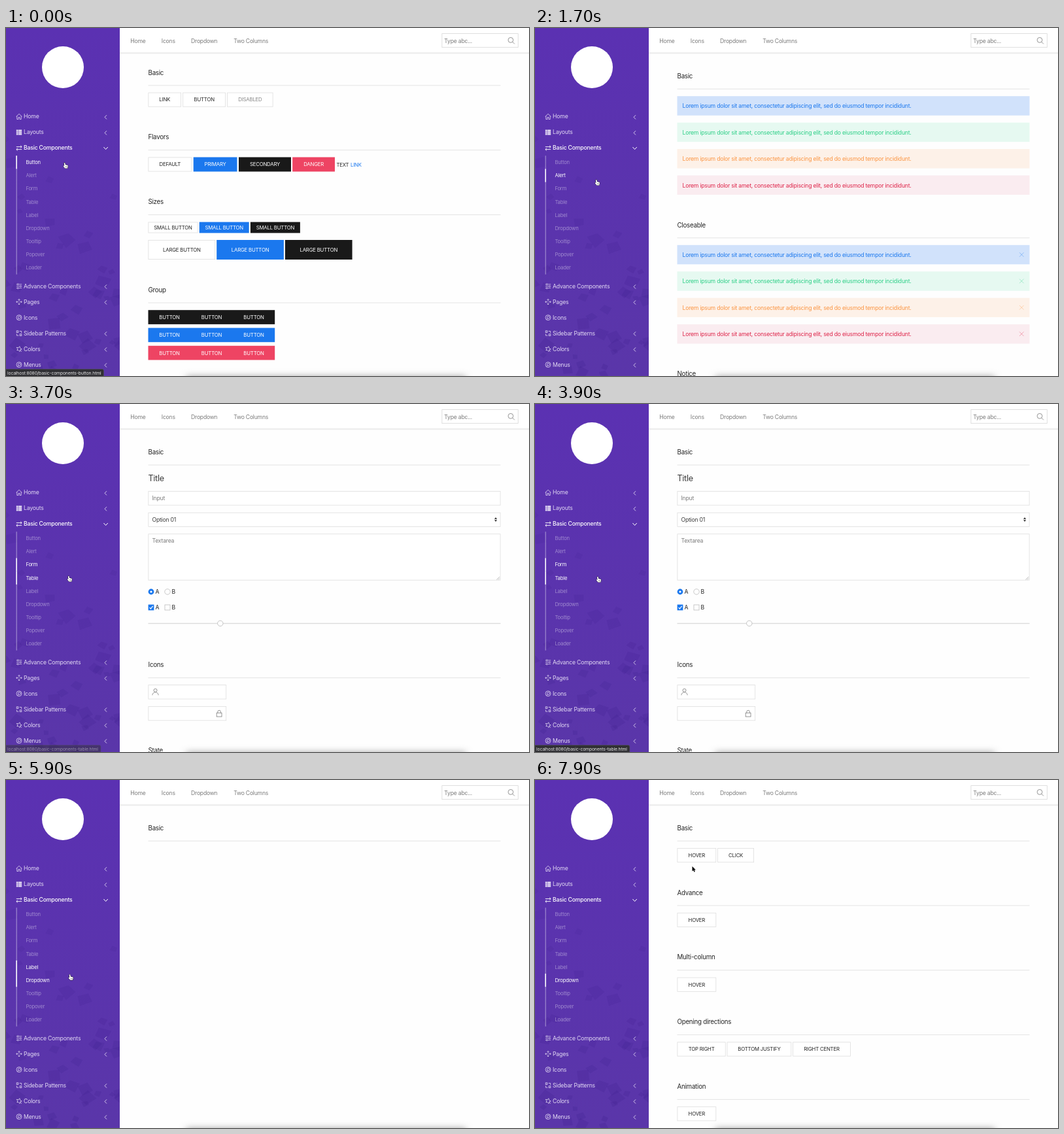
An HTML page with a canvas that plays this animation: 800 by 532 pixels, repeating every 8000 ms.

```html
<!DOCTYPE html>
<html lang="en">
<head>
<meta charset="utf-8">
<title>Component gallery</title>
<style>
html, body { margin: 0; width: 100%; height: 100%; overflow: hidden; background: #fefefe; }
canvas { display: block; width: 800px; height: 532px; }
</style>
</head>
<body>
<canvas id="stage"></canvas>
<script>
const W = 800, H = 532, LOOP = 8000, STEP = 100;
const canvas = document.getElementById('stage');
const c = canvas.getContext('2d');
const dpr = window.devicePixelRatio || 1;
canvas.width = W * dpr;
canvas.height = H * dpr;

const BLUE = '#1b78ee', BLACK = '#191919', RED = '#ee4463';
const INK = '#242424', EDGE = '#dedede', RULE = '#e2e2e2', GREY = '#7c7c7c';
const LEFT = 217.5, RIGHT = 756.5;
const BODY = 8.65, SMALL = 7.78, HEAD = 9.73;

// y is the middle of the capitals
function text(str, x, y, size = BODY, color = INK, align = 'left', weight = 400) {
  c.font = `${weight} ${size}px Inter, "Open Sans", sans-serif`;
  c.letterSpacing = (-0.024 * size) + 'px';
  c.textAlign = align;
  c.fillStyle = color;
  c.fillText(str, x, y + size * 0.364);
}
function line(color, width, ...pts) {
  c.strokeStyle = color;
  c.lineWidth = width;
  c.beginPath();
  for (let i = 0; i < pts.length; i += 2) c.lineTo(pts[i], pts[i + 1]);
  c.stroke();
}
function rect(x, y, w, h, fill, edge) {
  if (fill) { c.fillStyle = fill; c.fillRect(x, y, w, h); }
  if (edge) { c.strokeStyle = edge; c.lineWidth = 0.8; c.strokeRect(x + 0.4, y + 0.4, w - 0.8, h - 0.8); }
}
function disc(x, y, r, fill, edge, width = 0.8) {
  c.beginPath();
  c.arc(x, y, r, 0, 7);
  if (fill) { c.fillStyle = fill; c.fill(); }
  if (edge) { c.strokeStyle = edge; c.lineWidth = width; c.stroke(); }
}
function rule(y) { rect(LEFT, y - 0.4, RIGHT - LEFT, 0.9, RULE); }
function section(title, y) {
  text(title, LEFT, y, HEAD);
  rule(y + 19.8);
}
function button(label, x1, x2, y, h = 22, fill = '', color = fill ? '#fff' : INK) {
  rect(x1, y, x2 - x1, h, fill || '#fff', fill ? '' : EDGE);
  text(label, (x1 + x2) / 2, y + h / 2, SMALL, color, 'center');
}

function buttonPage() {
  section('Basic', 68);
  button('LINK', LEFT, 268, 98.6);
  button('BUTTON', 270.3, 336, 98.6);
  button('DISABLED', 338.2, 408.5, 98.6, 22, '', '#858585');
  section('Flavors', 166.8);
  button('DEFAULT', LEFT, 284.2, 197.5);
  button('PRIMARY', 286.7, 353.5, 197.5, 22, BLUE);
  button('SECONDARY', 356, 436, 197.5, 22, BLACK);
  button('DANGER', 438.2, 503, 197.5, 22, RED);
  text('TEXT', 505.5, 208.8, SMALL);
  text('LINK', 527, 208.8, SMALL, BLUE);
  section('Sizes', 265.6);
  ['', BLUE, BLACK].forEach((fill, i) => {
    button('SMALL BUTTON', LEFT + i * 78.2, 293.5 + i * 78.2, 296.6, 16.8, fill);
    button('LARGE BUTTON', LEFT + i * 104.7, 320.2 + i * 104.7, 324, 30, fill);
  });
  section('Group', 400.2);
  [BLACK, BLUE, RED].forEach((fill, i) => {
    const y = 431.2 + i * 27.3;
    rect(LEFT, y, 193.7, 21.7, fill);
    for (let k = 0; k < 3; k++) text('BUTTON', 250 + k * 64.5, y + 10.9, SMALL, '#fff', 'center');
  });
}

const ALERTS = [['#d1e2fb', BLUE], ['#e6f9f1', '#2bcf86'], ['#fdf1e8', '#fb9542'], ['#faecf0', '#de2449']];
function alerts(top, closable) {
  ALERTS.forEach(([bg, fg], i) => {
    const y = top + i * 40.4;
    rect(LEFT, y, RIGHT - LEFT, 29.5, bg);
    text('Lorem ipsum dolor sit amet, consectetur adipiscing elit, sed do eiusmod tempor incididunt.',
      225.5, y + 15, BODY, fg);
    if (!closable) return;
    c.globalAlpha = 0.5;
    line(fg, 0.7, 741, y + 11.4, 747.6, y + 18);
    line(fg, 0.7, 747.6, y + 11.4, 741, y + 18);
    c.globalAlpha = 1;
  });
}
function alertPage() {
  section('Basic', 73.3);
  alerts(104.2);
  section('Closeable', 301);
  alerts(331.8, true);
  section('Notice', 528.3);
}

function formPage() {
  const full = RIGHT - LEFT;
  section('Basic', 73.3);
  text('Title', LEFT, 113.6, 12.6, '#3a3a3a');
  rect(LEFT, 133, full, 22.2, '#fff', EDGE);
  text('Input', 223.5, 144.3, BODY, GREY);
  rect(LEFT, 165.8, full, 22.2, '#fff', EDGE);
  text('Option 01', 223.5, 177, BODY, '#3a3a3a');
  c.fillStyle = '#333';
  c.beginPath();
  c.moveTo(747, 175.9); c.lineTo(749.1, 173.2); c.lineTo(751.2, 175.9);
  c.moveTo(747, 177.3); c.lineTo(749.1, 180); c.lineTo(751.2, 177.3);
  c.fill();
  rect(LEFT, 198.4, full, 71.2, '#fff', EDGE);
  text('Textarea', 223.5, 208.4, BODY, GREY);
  line('#888', 0.6, 750.6, 268.6, 755, 264.2);
  line('#888', 0.6, 753, 268.6, 755, 266.6);
  disc(222, 287, 4.4, BLUE);
  disc(222, 287, 1.6, '#fff');
  disc(247, 287, 4.2, '#fff', '#bbb');
  rect(217.6, 306.6, 8.8, 8.8, BLUE);
  line('#fff', 1.2, 219.6, 311.2, 221.4, 313, 224.6, 308.8);
  rect(242.6, 306.6, 8.8, 8.8, '#fff', '#bbb');
  for (const y of [287.2, 311.2]) {
    text('A', 228.4, y);
    text('B', 253.4, y);
  }
  rect(LEFT, 334.8, full, 1.4, '#dcdcdc');
  disc(327.8, 335.4, 4.2, '#fff', '#b8b8b8');
  section('Icons', 398.8);
  rect(LEFT, 429.2, 119.6, 22.2, '#fff', EDGE);
  rect(LEFT, 462, 119.6, 22.2, '#fff', EDGE);
  disc(228.5, 437.8, 2.5, '', GREY, 0.8);
  c.beginPath();
  c.arc(228.5, 445.2, 4.6, Math.PI, 0);
  c.stroke();
  c.strokeRect(322.2, 472.2, 7.8, 5.8);
  c.beginPath();
  c.arc(326.1, 470.6, 2.3, Math.PI, 0);
  c.lineTo(328.4, 472.2);
  c.moveTo(323.8, 470.6);
  c.lineTo(323.8, 472.2);
  c.stroke();
  section('State', 529.3);
}

function cells(label, y, size = BODY, color = '#3a3a3a') {
  for (let k = 0; k < 3; k++) text(label, 224 + k * 179.5, y, size, color);
}
function tablePage() {
  section('Basic', 73.3);
  cells('TABLE HEADING', 119, SMALL, GREY);
  cells('Table Data', 148.8);
  cells('Table Data', 179.4);
  cells('Table Footer', 209.2, 7.7);
  section('Bordered', 269.3);
  cells('TABLE HEADING', 315, SMALL, GREY);
  for (let i = 0; i < 3; i++) {
    rule(329.4 + i * 31.1);
    cells('Table Data', 345.2 + i * 31.1);
  }
  section('Striped', 468.5);
  cells('TABLE HEADING', 514.2, SMALL, GREY);
  rule(528.6);
}

function labelPage() {
  section('Basic', 73.3);
}

function dropdownPage() {
  ['Basic', 'Advance', 'Multi-column', 'Opening directions', 'Animation'].forEach((title, i) => {
    const y = 73.3 + i * 98.8;
    section(title, y);
    if (i !== 3) return button('HOVER', LEFT, 277.2, y + 30.8);
    button('TOP RIGHT', LEFT, 291.6, y + 30.8);
    button('BOTTOM JUSTIFY', 293.6, 392.2, y + 30.8);
    button('RIGHT CENTER', 394.2, 482.8, y + 30.8);
  });
  button('CLICK', 279.2, 335, 104.1);
}

function header() {
  rect(174, 0, 626, 37.6, '#fff');
  rect(174, 37.6, 626, 1, '#d9d9d9');
  rect(174, 38.6, 626, 1.2, '#f4f4f4');
  text('Home', 190.3, 19.5, 8.6, GREY);
  text('Icons', 237.8, 19.5, 8.6, GREY);
  text('Dropdown', 283, 19.5, 8.6, GREY);
  text('Two Columns', 348.2, 19.5, 8.6, GREY);
  rect(666.5, 8.2, 117.2, 21.8, '#fff', '#d8d8d8');
  text('Type abc...', 670.3, 19.5, BODY, GREY);
  disc(772, 18.4, 3.9, '', GREY);
  line(GREY, 0.8, 774.8, 21.2, 778, 24.4);
}

// Icons are drawn around the origin in a 9 px box.
const smile = () => {
  disc(0, 0, 4, '', '#e2d9f3');
  disc(0.4, -0.3, 1.9, '', '#e2d9f3');
  line('#e2d9f3', 0.8, -2.6, 2.9, -0.6, 1.3);
};
const ICONS = {
  home: p => {
    line(p, 0.8, -4.4, 0, 0, -4.2, 4.4, 0);
    line(p, 0.8, -3.2, -1, -3.2, 4, -1, 4, -1, 1, 1, 1, 1, 4, 3.2, 4, 3.2, -1);
  },
  grid: p => {
    for (const y of [-4, -1.2, 1.6]) {
      rect(-4.2, y, 2.8, 2.4, p);
      rect(-0.9, y, 5.1, 2.4, p);
    }
  },
  swap: p => {
    line(p, 0.9, -4.2, -2, 4, -2);
    line(p, 0.9, 2.2, -3.8, 4.2, -2, 2.2, -0.2);
    line(p, 0.9, 4.2, 2, -4, 2);
    line(p, 0.9, -2.2, 0.2, -4.2, 2, -2.2, 3.8);
  },
  sliders: p => [-2.9, 0, 2.9].forEach((y, i) => {
    line(p, 0.7, -4.2, y, 4.2, y);
    disc(i % 2 ? 2.4 : -1.8, y, 1.1, '#5b36ab', p, 0.7);
  }),
  move: p => {
    for (let i = 0; i < 4; i++) {
      line(p, 0.8, 0, 1, 0, 4.2);
      line(p, 0.8, -1.4, 2.9, 0, 4.3, 1.4, 2.9);
      c.rotate(Math.PI / 2);
    }
  },
  smile,
  blocks: p => {
    c.strokeStyle = p;
    c.lineWidth = 0.8;
    c.strokeRect(-3.8, -3.8, 2.6, 2.6);
    c.strokeRect(1.2, 1.2, 2.6, 2.6);
    line(p, 0.8, 0.6, -3.2, 3.6, -3.2, 3.6, -0.4);
    line(p, 0.8, -3.6, 0.8, -3.6, 3.4, -0.6, 3.4);
  },
  pin: p => {
    line(p, 0.8, -3.8, -2.4, -0.8, -1.8, 0.8, -4, 1.8, -1, 4.2, 0.2, 1.6, 1.4, 1, 4, -1, 1.8, -3.2, 2, -2, 0, -3.8, -2.4);
    line(p, 0.8, 1.6, 1.6, 4, 4);
  }
};
const MENU = [
  ['Home', 135.2, 'home'], ['Layouts', 159.2, 'grid'], ['Basic Components', 183.3, 'swap'],
  ['Advance Components', 394.4, 'sliders'], ['Pages', 418.4, 'move'], ['Icons', 442.4, 'smile'],
  ['Sidebar Patterns', 466.4, 'blocks'], ['Colors', 490.4, 'pin'], ['Menus', 514.4, 'smile']
];
const SUB = ['Button', 'Alert', 'Form', 'Table', 'Label', 'Dropdown', 'Tooltip', 'Popover', 'Loader'];
const ROW = 20.17, SUB_TOP = 195.2;

function backdrop() {
  const g = c.createLinearGradient(0, 0, 0, H);
  g.addColorStop(0, '#5b31b2');
  g.addColorStop(1, '#5a36a9');
  rect(0, 0, 174, H, g);
  let seed = 11;
  const rnd = () => (seed = seed * 16807 % 2147483647) / 2147483647;
  for (let i = 0; i < 46; i++) {
    const x = rnd() * 174, y = 110 + 420 * Math.sqrt(rnd()), r = 5 + rnd() * 9, a = rnd() * 6;
    c.fillStyle = `rgba(50,20,130,${0.04 + 0.11 * y / H})`;
    c.beginPath();
    for (let k = 0; k < 4; k++) {
      const q = Math.min(174, x + r * Math.cos(a + k * 1.5));
      c.lineTo(q, y + r * (0.6 + 0.4 * rnd()) * Math.sin(a + k * 1.5));
    }
    c.fill();
  }
}

function sidebar(active, hover) {
  backdrop();
  disc(87, 60, 32, '#fff');
  for (const [label, y, icon] of MENU) {
    const open = icon === 'swap';
    const paint = open ? '#fff' : '#e2d9f3';
    c.save();
    c.translate(20, y + 0.3);
    ICONS[icon](paint);
    c.restore();
    text(label, 27, y, 8.7, paint, 'left', open ? 500 : 400);
    if (open) line(paint, 1, 149.4, y - 1.3, 152.6, y + 2.2, 155.8, y - 1.3);
    else if (label !== 'Icons') line(paint, 0.9, 154, y - 2, 151, y + 1.1, 154, y + 4.2);
  }
  rect(15.6, SUB_TOP, 1.2, ROW * SUB.length, 'rgba(255,255,255,.42)');
  SUB.forEach((label, i) => {
    const lit = i === active || i === hover;
    if (lit) rect(15.4, SUB_TOP + i * ROW, 1.5, ROW, '#fff');
    text(label, 30.4, SUB_TOP + (i + 0.5) * ROW, 7.7, lit ? '#fff' : 'rgba(255,255,255,.42)');
  });
}

function dockShadow() {
  c.save();
  c.shadowColor = 'rgba(0,0,0,.4)';
  c.shadowBlur = 11 * dpr;
  rect(276, 533, 427, 20, '#ccc');
  c.restore();
}

// [start, end, submenu row]
const HINTS = [[-500, 700, 0], [700, 1600, 1], [2100, 2600, 2], [3600, 4300, 3], [4700, 5400, 4], [6000, 7000, 5]];
function statusBar(t) {
  const hint = HINTS.find(h => t >= h[0] && t < h[1]);
  if (!hint) return;
  const url = `localhost:8080/basic-components-${SUB[hint[2]].toLowerCase()}.html`;
  c.globalAlpha = Math.min(1, (t - hint[0]) / 200);
  c.font = '400 6.82px Inter, "Open Sans", sans-serif';
  c.letterSpacing = (-0.024 * 6.82) + 'px';
  const w = c.measureText(url).width + 6;
  c.beginPath();
  c.roundRect(-2, 521.6, w + 2, 12, [0, 2.4, 0, 0]);
  c.fillStyle = '#303034';
  c.fill();
  c.strokeStyle = '#55535c';
  c.lineWidth = 0.6;
  c.stroke();
  text(url, 2, 527.2, 6.82, '#e6e6e6');
  c.globalAlpha = 1;
}

// [time, x, y] of the pointer tip
const PATH = [
  [0, 89.6, 206], [600, 91, 212], [1200, 92.8, 224], [1700, 93.8, 232], [2100, 94.4, 241],
  [3000, 95, 247], [3700, 95.8, 263], [4400, 96.2, 268], [5100, 97, 282.6],
  [6000, 97.6, 298], [6900, 97.6, 298], [7700, 240.5, 132], [8000, 240.5, 132]
];
function pointerAt(t) {
  const i = PATH.findIndex(p => p[0] > t);
  const [t0, x0, y0] = PATH[i - 1], [t1, x1, y1] = PATH[i];
  let k = (t - t0) / (t1 - t0);
  k = k * k * (3 - 2 * k);
  return [x0 + (x1 - x0) * k, y0 + (y1 - y0) * k];
}
function pointer(x, y, hand) {
  const arrow = 'M0 0V7.6L1.8 6L3 8.7L4.3 8.1L3.1 5.5H5.4Z';
  const palm = 'M-.9 .4Q0 -.6 .8 .4L1.2 3L4.3 3.7Q5.4 4 5.1 5.4L4.5 8.4H.6L-1.8 5.4Q-2.2 4.1 -1 4.4L-.3 5Z';
  const shape = new Path2D(hand ? palm : arrow);
  c.save();
  c.translate(x, y);
  c.lineJoin = 'round';
  c.lineWidth = hand ? 0.9 : 1;
  c.strokeStyle = hand ? '#111' : '#fff';
  c.fillStyle = hand ? '#fff' : '#000';
  c.stroke(shape);
  c.fill(shape);
  if (hand) for (const k of [1.4, 2.6, 3.8]) line('#333', 0.4, k, 5.2, k, 7.2);
  c.restore();
}

// [start, submenu row, draw]
const PAGES = [
  [0, 0, buttonPage], [1500, 1, alertPage], [2500, 2, formPage],
  [4200, 3, tablePage], [5300, 4, labelPage], [6400, 5, dropdownPage]
];
function draw(t) {
  c.setTransform(dpr, 0, 0, dpr, 0, 0);
  rect(0, 0, W, H, '#fefefe');
  const [, row, page] = PAGES.filter(p => p[0] <= t).pop();
  const [x, y] = pointerAt(t);
  const hover = x < 158 ? Math.floor((y - SUB_TOP) / ROW) : -1;
  page();
  header();
  dockShadow();
  sidebar(row, hover);
  statusBar(t);
  pointer(x, y, hover >= 0);
}

const begin = performance.now();
function tick() {
  const t = (performance.now() - begin) % LOOP;
  draw(Math.floor(t / STEP) * STEP);
  requestAnimationFrame(tick);
}
tick();
</script>
</body>
</html>
```
